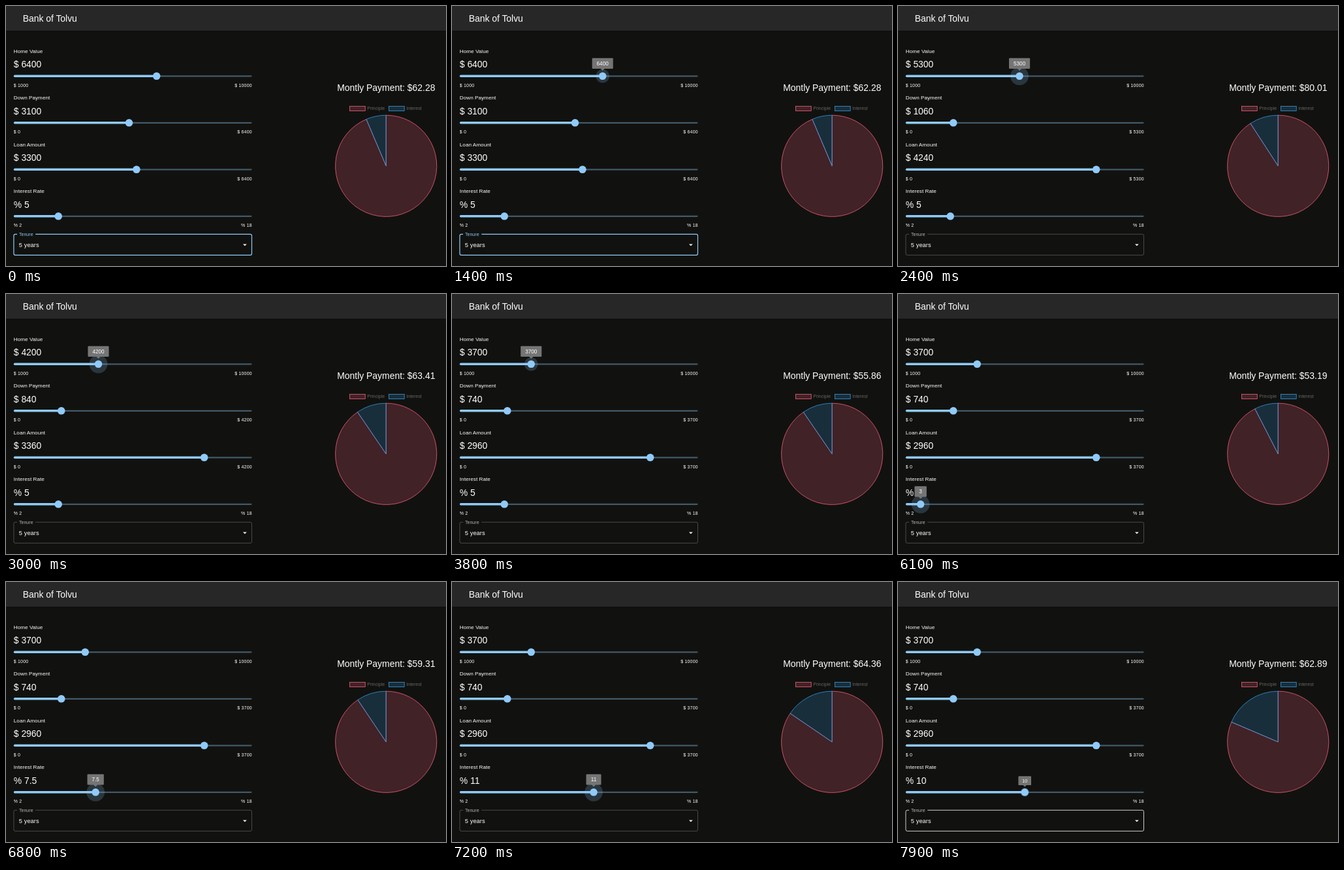
These frames come from a looping animation (674 px wide and 398 px high, 8000 ms). An HTML page:

```html
<!DOCTYPE html>
<html lang="en">
<head>
<meta charset="utf-8">
<title>Loan calculator</title>
<style>
  html, body { margin: 0; width: 100%; height: 100%; overflow: hidden; background: #11120f; }
  svg { display: block; font-family: "Liberation Sans", Arial, sans-serif; fill: #fff; }
</style>
</head>
<body>
<svg id="stage" width="674" height="398" viewBox="0 0 674 398"></svg>
<script>
const stage = document.getElementById('stage');
const LOOP = 8000, STEP = 100;
const LEFT = 11.8, WIDTH = 364.8, RIGHT = LEFT + WIDTH;
const BLUE = '#90caf9';
const PIE = { x: 582.2, y: 244.8, r: 77.6 };
const RED = '#ff6384', CYAN = '#36a2eb';

// Time tracks: [ms, value] points joined by straight lines
const tracks = {
  home: [[1800, 6400], [2400, 5300], [3300, 3700]],
  rate: [[5500, 5], [6100, 3], [6400, 3], [6800, 7.5], [7300, 12], [7400, 12], [7700, 10]],
  homeHalo: [[1150, 0], [1300, 4.6], [1650, 4.6], [1850, 8.1], [3600, 8.1], [3750, 4.6], [4050, 4.6], [4200, 0]],
  homeTip: [[1150, 0], [1300, 1], [4050, 1], [4200, 0]],
  rateHalo: [[5050, 0], [5200, 4.6], [5350, 8.1], [7700, 8.1], [7900, 1], [7950, 0]],
  rateTip: [[5050, 0], [5200, 1], [7850, 1], [8000, 0.55]],
};

function at(points, t) {
  const i = points.findIndex(p => p[0] > t);
  if (i === 0) return points[0][1];
  if (i < 0) return points[points.length - 1][1];
  const [t0, a] = points[i - 1], [t1, b] = points[i];
  return a + (b - a) * (t - t0) / (t1 - t0);
}

function loanAt(t) {
  const home = Math.round(at(tracks.home, t) / 100) * 100;
  const rate = Math.round(at(tracks.rate, t) * 2) / 2;
  const down = home === 6400 ? 3100 : Math.round(home * 0.2);
  const loan = home - down, r = rate / 1200, months = 60;
  const payment = loan * r / (1 - (1 + r) ** -months);
  const interest = payment * months - loan;
  return { home, rate, down, loan, payment, share: interest / (home + interest) };
}

// Each change restarts a one second ease-out from the share shown at that moment
function shownShare(now) {
  let last = loanAt(0), from = last.share, start = -1000;
  const value = t => last.share + (from - last.share) * (1 - Math.min(1, (t - start) / 1000)) ** 4;
  for (let t = 0; t <= now; t += STEP) {
    const next = loanAt(t);
    if (next.home !== last.home || next.rate !== last.rate) {
      from = value(t);
      start = t;
      last = next;
    }
  }
  return value(now);
}

const text = (x, y, size, s, extra = '') => `<text x="${x}" y="${y}" font-size="${size}" ${extra}>${s}</text>`;
const rect = (x, y, w, h, extra) => `<rect x="${x}" y="${y}" width="${w}" height="${h}" ${extra}/>`;

function tooltip(x, y, label, scale) {
  if (scale <= 0) return '';
  const w = 13.9 + String(label).replace('.', '').length * 4.55 + (String(label).includes('.') ? 2.3 : 0);
  return `<g transform="translate(${x} ${y - 8.3}) scale(${scale})">
    <path d="M${-w / 2 + 1} -19.2H${w / 2 - 1}q1 0 1 1V-3.9q0 1 -1 1H3L0 0L-3 -2.9H${-w / 2 + 1}q-1 0 -1 -1V-18.2q0 -1 1 -1z" fill="#757575"/>
    ${text(0, -8.2, 8.2, label, 'text-anchor="middle"')}</g>`;
}

function slider(row, name, unit, value, min, max, halo = 0, tip = 0) {
  const y = 107.3 + row * 71.5;
  const x = LEFT + WIDTH * (value - min) / (max - min);
  const caption = 'letter-spacing=".22"';
  return text(LEFT, y - 35.5, 8.1, name, 'letter-spacing=".05"')
    + text(LEFT, y - 13, 13.9, `${unit} ${value}`)
    + rect(LEFT, y - 1.15, WIDTH, 2.3, `rx="1.15" fill="${BLUE}" opacity=".38"`)
    + rect(LEFT, y - 1.73, x - LEFT, 3.46, `rx="1.7" fill="${BLUE}"`)
    + (halo > 0 ? `<circle cx="${x}" cy="${y}" r="${5.8 + halo}" fill="${BLUE}" opacity=".2"/>` : '')
    + `<circle cx="${x}" cy="${y}" r="5.8" fill="${BLUE}"/>`
    + text(LEFT, y + 16.6, 6.95, `${unit} ${min}`, caption)
    + text(RIGHT + 0.2, y + 16.6, 6.95, `${unit} ${max}`, caption + ' text-anchor="end"')
    + tooltip(x, y, value, tip);
}

function tenure(focused, hovered) {
  const border = focused ? BLUE : hovered ? '#fff' : 'rgba(255,255,255,.3)';
  return `<path d="M45.2 349.3H374.2q2.3 0 2.3 2.3V379q0 2.3 -2.3 2.3H14.2q-2.3 0 -2.3 -2.3V351.6q0 -2.3 2.3 -2.3H17"
      fill="none" stroke="${border}" stroke-width="${focused ? 1.2 : 0.8}"/>`
    + text(20, 351.9, 6.95, 'Tenure', `letter-spacing=".06" fill="${focused ? BLUE : '#b8b8b7'}"`)
    + text(19.8, 368.6, 9.25, '5 years', 'letter-spacing=".08"')
    + '<path d="M363 364.4h5.8l-2.9 2.9z"/>';
}

function slice(from, to, color) {
  const point = turn => {
    const a = turn * 2 * Math.PI;
    return `${PIE.x + PIE.r * Math.sin(a)} ${PIE.y - PIE.r * Math.cos(a)}`;
  };
  return `<path d="M${PIE.x} ${PIE.y}L${point(from)}A${PIE.r} ${PIE.r} 0 ${to - from > 0.5 ? 1 : 0} 1 ${point(to)}Z"
    fill="${color}" fill-opacity=".2" stroke="${color}" stroke-width=".75" stroke-linejoin="round"/>`;
}

function legend(x, name, color) {
  return rect(x, 153.5, 23.6, 7.1, `fill="${color}" fill-opacity=".2" stroke="${color}" stroke-width=".75"`)
    + text(x + 26.7, 159.3, 7, name, 'fill="#666"');
}

function draw(t) {
  const { home, rate, down, loan, payment } = loanAt(t);
  const split = 1 - shownShare(t);
  const track = name => at(tracks[name], t);
  stage.innerHTML = rect(0, 0, 674, 39, 'fill="#0c0d0b"')
    + rect(0, 0, 674, 37.8, 'fill="#272727"')
    + text(25.7, 24, 13.9, 'Bank of Tolvu')
    + slider(0, 'Home Value', '$', home, 1000, 10000, track('homeHalo'), track('homeTip'))
    + slider(1, 'Down Payment', '$', down, 0, home)
    + slider(2, 'Loan Amount', '$', loan, 0, home)
    + slider(3, 'Interest Rate', '%', rate, 2, 18, track('rateHalo'), track('rateTip'))
    + tenure(t < 1700, t >= 7800)
    + text(582.3, 129.8, 13.95, `Montly Payment: $${payment.toFixed(2)}`, 'text-anchor="middle"')
    + legend(526.6, 'Principle', RED)
    + legend(586.6, 'Interest', CYAN)
    + slice(0, split, RED)
    + slice(split, 1, CYAN);
}

let shown = -1;
const begin = performance.now();
function tick() {
  const t = Math.floor((performance.now() - begin) % LOOP / STEP) * STEP;
  if (t !== shown) draw(shown = t);
  requestAnimationFrame(tick);
}
tick();
</script>
</body>
</html>
```
